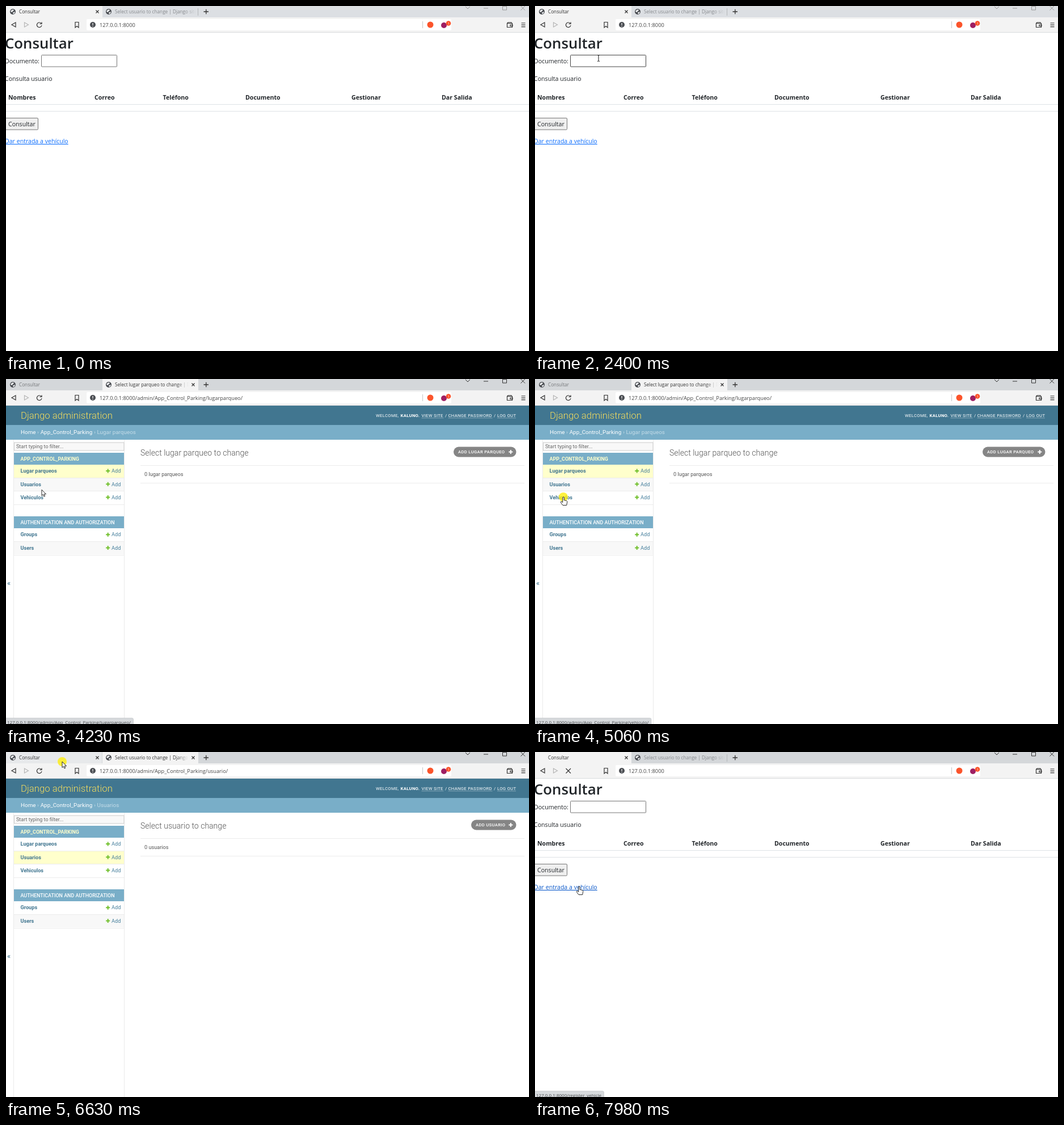
Recreate the animation shown at these times as an HTML page. Size 922 by 608 pixels, loop 8 s.

```html
<!DOCTYPE html>
<html lang="es">
<head>
<meta charset="utf-8">
<title>Consultar</title>
<style>
html, body { margin: 0; width: 100%; height: 100%; overflow: hidden; background: #fff; }
svg { display: block; width: 100vw; height: 100vh; }
text { white-space: pre; }
.ui { font-family: "Open Sans", "Noto Sans", sans-serif; }
.tab { font-size: 8.2px; }
.url { font-size: 9.25px; fill: #444; }
#home { font-size: 10.6px; fill: #212529; }
#admin { font-family: Roboto, sans-serif; font-size: 9.17px; }
.b { font-weight: 700; }
.caps { font-size: 7.7px; letter-spacing: .3px; fill: #fff; }
.crumb { font-size: 9.87px; fill: #fff; }
.cap { font-size: 8.95px; font-weight: 500; fill: #fff; }
.line { fill: none; stroke-width: 1; }
</style>
</head>
<body>
<svg viewBox="0 0 922 608">
  <defs>
    <linearGradient id="fadeOn" gradientUnits="userSpaceOnUse" x1="300" x2="322">
      <stop stop-color="#333"/><stop offset="1" stop-color="#333" stop-opacity="0"/>
    </linearGradient>
    <linearGradient id="fadeOff" gradientUnits="userSpaceOnUse" x1="316" x2="335">
      <stop stop-color="#85888c"/><stop offset="1" stop-color="#85888c" stop-opacity="0"/>
    </linearGradient>
    <g id="globe">
      <circle r="5" fill="#484b50"/>
      <path d="M-4-1Q-2-4 1-4L2-2 0-1-1 1-3 .5ZM1 1 4 0 3 3 1 4 0 2.5Z" fill="#eceef0"/>
    </g>
    <path id="close" d="M-2.5-2.5 2.5 2.5M2.5-2.5-2.5 2.5" stroke="#333" stroke-width="1.2"/>
    <path id="plus" d="M-3.5 0H3.5M0-3.5V3.5" stroke-width="2"/>
  </defs>

  <g id="home" class="ui"></g>
  <g id="admin"></g>

  <g id="chrome" class="ui">
    <rect id="bar" width="922" height="20"/>
    <rect id="hover" height="20" fill="#e7e9eb"/>
    <rect id="active" height="20" fill="#f3f3f3"/>
    <path id="sep" class="line" d="M338.5 4V17" stroke="#b4b7ba"/>
    <use id="icon" href="#globe" x="12" y="10"/>
    <use href="#globe" x="181" y="10"/>
    <text id="tabA" class="tab" x="23" y="13">Consultar</text>
    <text id="tabB" class="tab" x="192" y="13"></text>
    <use id="closeA" href="#close" x="161" y="10"/>
    <use id="closeB" href="#close" x="330" y="10"/>
    <path class="line" d="M348.5 10H357M352.8 5.7V14.3" stroke="#333" style="stroke-width:1.3"/>
    <path id="controls" class="line" d="M810 1 814 5 818 1M842 4H850M875.5.5H882.5V7H875.5ZM907.5 0 915 7.5M915 0 907.5 7.5"/>
    <rect y="20" width="922" height="26.5" fill="#f3f3f3"/>
    <rect x="142" y="23" width="643" height="20" rx="2" fill="#fff"/>
    <rect y="46" width="922" height="1" fill="#d9dbdd"/>
    <g class="line" stroke="#333" style="stroke-width:1.2">
      <path d="M10 33 17 29V37Z"/>
      <path d="M39.500 33 32.500 29V37Z" stroke="#b5b5b5"/>
      <path id="reload" d="M62 30.500A4.300 4.300 0 1 0 63 34M63 28.500V31.500H59.500"/>
      <path id="stop" d="M54.500 29 63 37.500M63 29 54.500 37.500"/>
      <path d="M122 28.500H128V38L125 35.500 122 38Z"/>
      <path d="M883.500 30.500H892.500V37.500H883.500ZM883.500 30.500 885 29H891V30.500M889 33H893V35.500H889Z"/>
      <path d="M908.500 30H915.500M908.500 33.300H915.500M908.500 36.600H915.500"/>
      <path d="M734.500 27V39" stroke="#ccc"/>
    </g>
    <circle cx="153" cy="33" r="5" fill="#4c4f54"/>
    <path d="M153 30V33.700M153 35V36.200" stroke="#fff" stroke-width="1.2"/>
    <text id="url" class="url" x="165" y="36.500"></text>
    <circle cx="748" cy="33" r="5.500" fill="#fb542b"/>
    <circle cx="772" cy="34" r="5" fill="#9e1f63"/>
    <circle cx="780" cy="30.500" r="4.300" fill="#fb542b"/>
    <text x="778.600" y="32.700" font-size="6" fill="#fff">1</text>
  </g>

  <g id="status" class="ui">
    <rect id="statusBox" x="-3" y="597.500" height="14" rx="2.500" fill="#d6d9dc" stroke="#c3c6c9" stroke-width=".7"/>
    <text id="statusText" x="2" y="607.800" font-size="8" fill="#4a4d50"></text>
  </g>

  <circle id="click" r="8" fill="#fe0" opacity=".75"/>
  <path id="cursor" stroke-linejoin="round"/>
</svg>

<script>
const $ = id => document.getElementById(id);
const show = (id, on) => $(id).style.display = on ? '' : 'none';
const set = (id, attrs) => { for (const k in attrs) $(id).setAttribute(k, attrs[k]); };
const text = (x, y, s, attrs = '') => `<text x="${x}" y="${y}" ${attrs}>${s}</text>`;
const rect = (x, y, w, h, fill, attrs = '') =>
  `<rect x="${x}" y="${y}" width="${w}" height="${h}" fill="${fill}" ${attrs}/>`;

// Query page
const columns = [['Nombres', 4], ['Correo', 156], ['Teléfono', 276.5], ['Documento', 422], ['Gestionar', 609], ['Dar Salida', 768]];
$('home').innerHTML = rect(0, 46, 922, 562, '#fff') +
  text(-2, 75, 'Consultar', 'font-size="25.800" font-weight="600"') +
  text(-2, 101, 'Documento:') +
  rect(62.5, 86.5, 133, 20.5, '#fff', 'id="field" rx="1"') +
  text(-2, 131.5, 'Consulta usuario') +
  columns.map(([s, x]) => text(x, 164.7, s, 'class="b"')).join('') +
  rect(0, 173, 922, 1, '#dee2e6') + rect(0, 185, 922, 1, '#dee2e6') +
  rect(-3, 197.5, 59.5, 20.5, '#efefef', 'rx="1.500" stroke="#767676"') +
  text(4, 212, 'Consultar') +
  text(-2, 242, 'Dar entrada a vehículo', 'id="link" text-decoration="underline"');

// Admin page
const rows = [['Lugar parqueos', 162], ['Usuarios', 185.3], ['Vehiculos', 208.6], ['Groups', 274.2], ['Users', 297.5]];
const userLink = (x, end, s) => text(x, 66.6, s, 'class="caps"') + rect(x, 68.5, end - x, .7, '#9fbac8');
$('admin').innerHTML = rect(0, 46, 922, 562, '#fff') +
  rect(0, 47, 922, 34, '#417690') + rect(0, 81, 922, 26, '#79aec8') +
  text(26, 69.8, 'Django administration', 'font-size="16.800" font-weight="300" fill="#f5dd5d"') +
  text(652, 66.6, 'WELCOME,', 'class="caps"') +
  text(695.5, 66.6, 'KALUNO.', 'class="caps b"') +
  userLink(732.5, 771.5, 'VIEW SITE') + text(774, 66.6, '/', 'class="caps"') +
  userLink(779.5, 857.5, 'CHANGE PASSWORD') + text(860, 66.6, '/', 'class="caps"') +
  userLink(866, 899, 'LOG OUT') +
  text(26, 97.4, 'Home', 'class="crumb"') + text(55, 97.4, '›', 'class="crumb" style="fill:#c4dce8"') +
  text(60.7, 97.4, 'App_Control_Parking', 'class="crumb"') +
  text(155, 97.4, '›', 'class="crumb" style="fill:#c4dce8"') +
  text(160.5, 97.4, '', 'id="crumb" class="crumb" style="fill:#c4dce8"') +
  rect(13, 107, 1, 501, '#eaeaea') + rect(208, 107, 1, 501, '#eaeaea') +
  text(2, 364, '«', 'font-size="13" fill="#417690"') +
  rect(14.5, 112, 193.5, 14, '#f8f8f8', 'stroke="#ccc"') +
  text(18, 122.3, 'Start typing to filter...', 'font-size="9.050" fill="#666"') +
  rect(14, 130, 194, 21, '#79aec8') + rect(14, 242, 194, 21, '#79aec8') +
  text(25.5, 143.5, 'APP_CONTROL_PARKING', 'class="cap b" style="fill:#ffc;font-weight:700"') +
  text(25.5, 255.7, 'AUTHENTICATION AND AUTHORIZATION', 'class="cap"') +
  rect(14, 174, 194, 23, '#f8f8f8') + rect(14, 286, 194, 23, '#f8f8f8') +
  rect(14, 0, 194, 23, '#ffc', 'id="current"') +
  rows.map(([s, y]) => rect(14, Math.round(y) + 12, 194, 1, '#ececec') +
    text(25.5, y + 3.2, s, 'class="b" fill="#417690"') +
    `<use href="#plus" x="179.700" y="${y}" stroke="#70bf2b"/>` +
    text(186, y + 3.2, 'Add', 'fill="#447e9b"')).join('') +
  text(237, 135, '', 'id="heading" font-size="14.050" font-weight="300" fill="#555"') +
  rect(0, 119.5, 0, 18, '#858585', 'id="pill" rx="9"') +
  text(0, 131, '', 'id="add" class="caps" font-weight="500"') +
  '<use href="#plus" x="889.800" y="128.500" stroke="#fff"/>' +
  rect(237, 152, 677, 1, '#ececec') + rect(237, 183, 677, 1, '#ececec') +
  text(244, 171.2, '', 'id="count" fill="#555"');

const models = {
  usuario: { name: 'usuario', row: 174, pill: 820 },
  lugarparqueo: { name: 'lugar parqueo', row: 151, pill: 789 },
  vehiculo: { name: 'vehiculo', row: 197, pill: 815 }
};
const host = '127.0.0.1:8000';
const adminUrl = m => `${host}/admin/App_Control_Parking/${m}/`;

// Timelines: [start, value]
const pages = [[0, ''], [2850, 'usuario'], [3870, 'lugarparqueo'], [5130, 'vehiculo'], [5950, 'usuario'], [6700, '']];
const statuses = [[0, ''], [3680, adminUrl('lugarparqueo')], [4540, adminUrl('vehiculo')],
  [5600, adminUrl('usuario')], [6300, ''], [7740, host + '/register_vehicle']];
const clicks = [[2790, 2850], [3740, 3810], [5000, 5070], [5820, 5890], [6630, 6760], [7920, 7980]];
const path = [
  [260, 738, 518], [730, 181, 248], [930, 181, 248], [1200, 118, 280], [1400, 98, 238], [1660, 112, 92],
  [2400, 112, 92], [2590, 237, 7], [3200, 237, 7], [3380, 145, 62], [3600, 58, 160], [4050, 58, 160],
  [4230, 63, 195], [4370, 60, 203], [4440, 60, 203], [4780, 50, 208], [5150, 50, 208], [5410, 45, 192],
  [5680, 42, 185], [6100, 42, 185], [6560, 99, 17], [7030, 99, 17], [7700, 78, 237], [8000, 78, 237]
];
const at = (list, t) => list.filter(([start]) => start <= t).pop()[1];

// Smooth curve through the path, standing still at every rest
function slope(i, k) {
  const a = path[i - 1], p = path[i], b = path[i + 1];
  if (!a || !b || a[k] === p[k] || b[k] === p[k]) return 0;
  if ((p[k] - a[k]) * (b[k] - p[k]) < 0) return 0;
  return (b[k] - a[k]) / (b[0] - a[0]);
}
function pointer(t, k) {
  let i = 0;
  while (i < path.length - 2 && path[i + 1][0] <= t) i++;
  const a = path[i], b = path[i + 1], d = b[0] - a[0];
  const u = Math.max(0, (t - a[0]) / d), v = 1 - u;
  return a[k] * v * v * (1 + 2 * u) + b[k] * u * u * (3 - 2 * u) +
    d * u * v * (slope(i, k) * v - slope(i + 1, k) * u);
}

const shapes = {
  arrow: ['M0 0V10.500L2.400 8.300 4 12 5.700 11.200 4.200 7.700H7.500Z', '#fff', .9],
  hand: ['M-1.200 1A1.200 1.200 0 0 1 1.200 1V5.500L5.500 6.500Q7 7 6.800 8.500L5.700 14.500H-1L-4.700 9.500Q-5 7.700-3.300 8L-1.200 9.500Z', '#fff', .9],
  beam: ['M-2-5.500Q0-5.500 0-4.500Q0-5.500 2-5.500M0-4.500V4.500M-2 5.500Q0 5.500 0 4.500Q0 5.500 2 5.500', 'none', 1]
};

function draw(t) {
  const page = at(pages, t), model = models[page];
  const focused = t >= 2790, loading = t >= 7980;
  const x = pointer(t, 1), y = pointer(t, 2), visible = t >= 260;
  const inField = visible && !page && x > 62 && x < 196 && y > 86 && y < 107;
  const onLink = visible && !page && x < 110 && Math.abs(y - 238) < 7;
  const onRow = page && x > 25 && x < 90 && rows.some(r => Math.abs(y - r[1]) < 6);

  show('home', !page);
  show('admin', page);
  set('field', { stroke: inField ? '#444' : '#767676' });
  set('link', { fill: onLink ? '#0a58ca' : '#0d6efd' });

  const { name, row, pill } = model || models.usuario;
  const title = `Select ${name} to change`;
  if (page) {
    $('crumb').textContent = name[0].toUpperCase() + name.slice(1) + 's';
    $('heading').textContent = title;
    $('count').textContent = `0 ${name}s`;
    $('add').textContent = 'ADD ' + name.toUpperCase();
    set('add', { x: pill + 8 });
    set('pill', { x: pill, width: 899.5 - pill });
    set('current', { y: row });
  }

  const overA = visible && y < 20 && x < 170, overB = visible && y < 20 && x > 170 && x < 339;
  set('bar', { fill: focused ? '#d4d7da' : '#dcdfe3' });
  set('active', { x: page ? 170 : 0, width: page ? 169 : 170 });
  set('hover', { x: overA ? 0 : 170, width: overA || overB ? 169 : 0 });
  set('tabA', { fill: page && !overA ? '#77797c' : '#333' });
  set('tabB', { fill: `url(#${page ? 'fadeOn' : 'fadeOff'})` });
  $('tabB').textContent = title + ' | Django site';
  show('sep', !page);
  show('closeA', !page || overA);
  show('closeB', page);
  show('icon', !loading);
  show('reload', !loading);
  show('stop', loading);
  set('controls', { stroke: focused ? '#333' : '#999' });
  $('url').textContent = page ? adminUrl(page) : host;

  const status = at(statuses, t);
  show('status', status);
  if (status) {
    $('statusText').textContent = status;
    set('statusBox', { width: $('statusText').getComputedTextLength() + 9.5 });
  }

  const place = `translate(${x} ${y})`;
  show('click', clicks.some(([a, b]) => t >= a && t < b));
  set('click', { transform: place });
  show('cursor', visible);
  const [d, fill, width] = shapes[inField ? 'beam' : onLink || onRow ? 'hand' : 'arrow'];
  set('cursor', { d, fill, stroke: '#111', 'stroke-width': width, transform: place });
}

const begin = performance.now();
function tick() {
  draw((performance.now() - begin) % 8000);
  requestAnimationFrame(tick);
}
tick();
</script>
</body>
</html>
```
